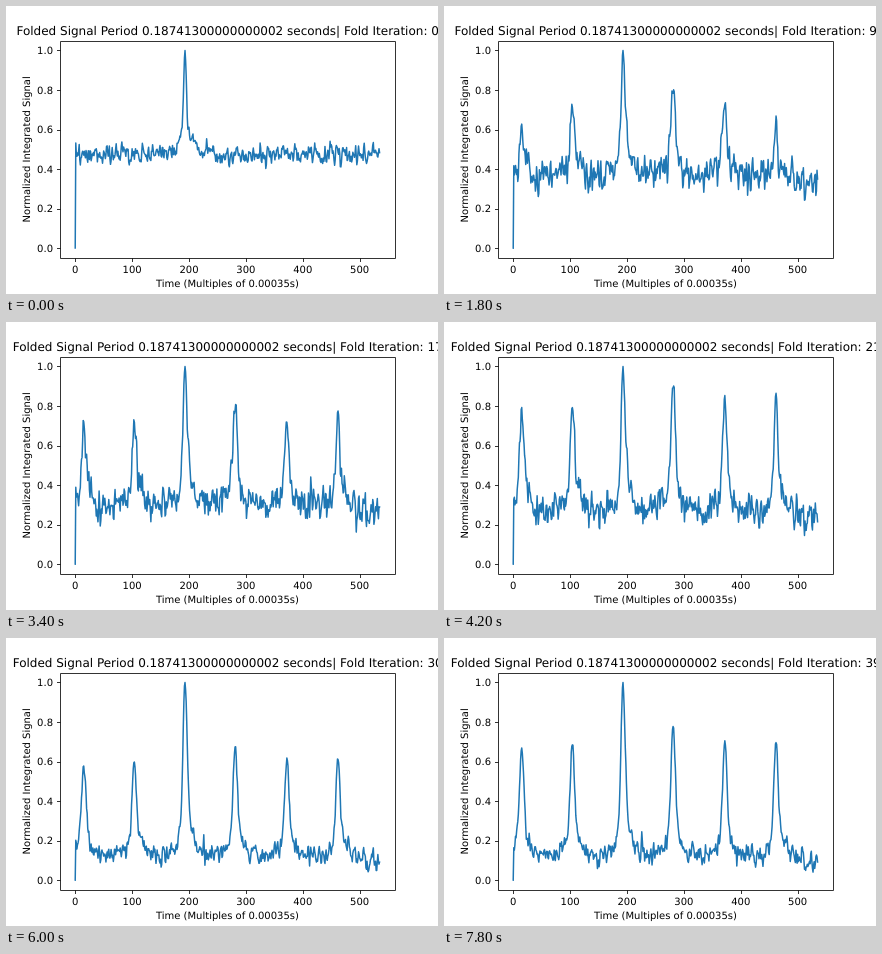
These frames come from a looping animation (432x288 px, 8000 ms). An HTML page:

```html
<!DOCTYPE html>
<html lang="en">
<head>
<meta charset="utf-8">
<title>Folded signal</title>
<style>
html, body { margin: 0; width: 100%; height: 100%; overflow: hidden; background: #fff; }
svg { display: block; width: 432px; height: 288px; }
text { font: 10px "DejaVu Sans", sans-serif; text-anchor: middle; text-rendering: geometricPrecision; }
#title { font-size: 12px; }
.end { text-anchor: end; }
#frame { fill: none; stroke: #000; stroke-width: .8; }
#signal { fill: none; stroke: #1f77b4; stroke-width: 1.5; stroke-linejoin: round; stroke-linecap: square; }
</style>
</head>
<body>
<svg viewBox="0 0 432 288">
  <path id="signal"/>
  <path id="frame"/>
  <g id="labels"></g>
  <text x="221.4" y="281">Time (Multiples of 0.00035s)</text>
  <text transform="translate(24 143.3) rotate(-90)">Normalized Integrated Signal</text>
  <text id="title" x="221.7" y="28.6"></text>
</svg>
<script>
const STEP = 200, FOLDS = 40, BINS = 536;
const BURST = 27; // a strong main pulse arrives here and shrinks the rest
const byId = id => document.getElementById(id);
const px = bin => 69.22 + bin * 0.5689;
const py = value => 242.12 - value * 197.67;
const snap = v => Math.floor(v + 0.5) + 0.5;
const clamp01 = v => Math.min(1, Math.max(0, v));

// Six pulses per folded span; ramp = folds until a pulse is fully grown
const MAIN = { center: 193, height: 1, ramp: 1 };
const PULSES = [
  { center: 15, height: .74, ramp: 12 },
  { center: 104, height: .78, ramp: 8.5 },
  MAIN,
  { center: 281, height: .86, ramp: 6 },
  { center: 372, height: .76, ramp: 7 },
  { center: 462, height: .78, ramp: 14 }
];

const valley = fold => fold < BURST ? .47 * Math.exp(-fold / 34) : .115;
const noiseSize = fold => fold < BURST ? .026 + .019 * clamp01(fold / 5) : .026;
const pulseWidth = fold => Math.min(3.5, 2.3 + .4 * fold);
const sideGain = fold => fold < BURST
  ? .93 + .22 * clamp01((fold - 17) / 7)
  : .78 + .14 * (fold - 30) / 9;

function pulseSize({ center, height, ramp }, fold) {
  const top = center === MAIN.center ? height : height * sideGain(fold);
  return (top - valley(fold)) * clamp01((fold + 1) / ramp) ** 2;
}

function randomizer(seed) {
  return () => {
    seed = (Math.imul(seed, 1664525) + 1013904223) >>> 0;
    return seed / 4294967296;
  };
}
const random = randomizer(1874);
const gaussian = () =>
  Math.sqrt(-2 * Math.log(1 - random())) * Math.cos(2 * Math.PI * random());
const bell = (d, sigma) => Math.exp(-d * d / (2 * sigma * sigma));
const pulse = (d, width) =>
  .74 * bell(d, width) + .2 * bell(d, d < 0 ? 7 : 10) + .06 * bell(d, 25);

// The noise drifts slowly, as every fold adds a little to the running sum
let noise = Array.from({ length: BINS + 1 }, gaussian);

function foldPath(fold) {
  const width = pulseWidth(fold);
  const sizes = PULSES.map(p => pulseSize(p, fold));
  const values = [];
  for (let bin = 0; bin < BINS; bin++) {
    let value = valley(fold), calm = 0;
    PULSES.forEach(({ center }, i) => {
      const shape = pulse(bin - center, width);
      value += sizes[i] * shape;
      calm = Math.max(calm, sizes[i] * shape);
    });
    const tilt = .04 * clamp01(fold / 5) * clamp01((bin - 480) / 55);
    const jitter = .8 * noise[bin] + .6 * noise[bin + 1];
    values.push(value - tilt + jitter * noiseSize(fold) * (1 - .7 * calm));
  }
  values[0] = 0;
  const top = Math.max(...values);
  return "M" + values.map((v, bin) =>
    px(bin).toFixed(2) + " " + py(v / top).toFixed(2)).join("L");
}

const paths = Array.from({ length: FOLDS }, (_, fold) => {
  if (fold) noise = noise.map(v => .94 * v + .341 * gaussian());
  return foldPath(fold);
});

function drawAxes() {
  let d = "M54.5 35.5H389.5V252.5H54.5Z", labels = "";
  for (let i = 0; i < 6; i++) {
    const x = px(i * 100), y = py(i / 5);
    d += `M${snap(x)} 252.5v3.5M54.5 ${snap(y)}h-3.5`;
    labels += `<text x="${x}" y="267">${i * 100}</text>` +
      `<text class="end" x="47" y="${y + 3.8}">${(i / 5).toFixed(1)}</text>`;
  }
  byId("frame").setAttribute("d", d);
  byId("labels").innerHTML = labels;
}

let shown = -1;
function render(now) {
  const fold = Math.floor(now / STEP) % FOLDS;
  if (fold === shown) return;
  shown = fold;
  byId("signal").setAttribute("d", paths[fold]);
  byId("title").textContent =
    `Folded Signal Period 0.18741300000000002 seconds| Fold Iteration: ${fold}`;
}

drawAxes();
render(0);
let start;
requestAnimationFrame(function tick(now) {
  start ??= now;
  render(now - start);
  requestAnimationFrame(tick);
});
</script>
</body>
</html>
```
